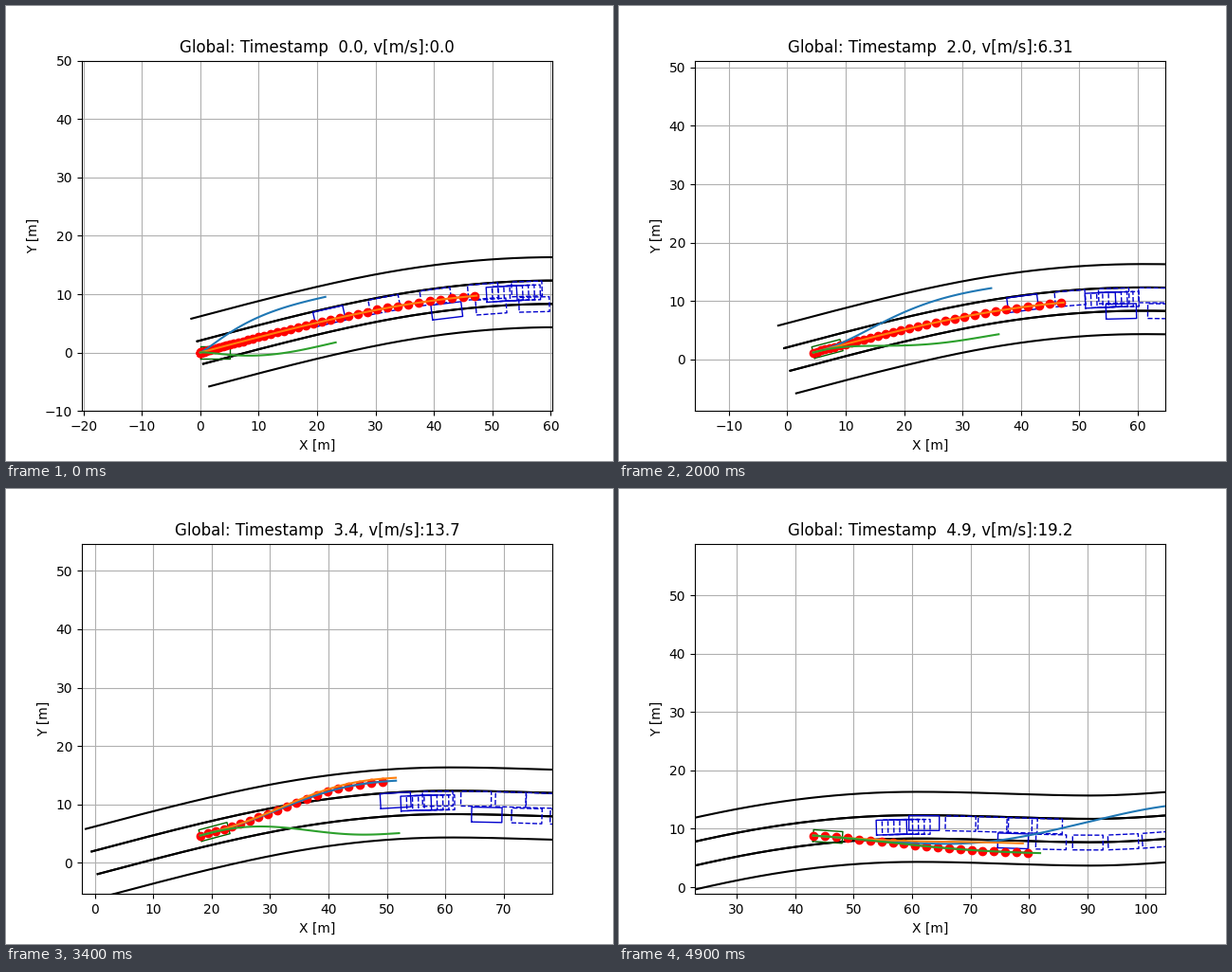
A matplotlib script that plays this animation: 640 px wide and 480 px high, repeating every 5 s.

```python
import numpy as np
import matplotlib.pyplot as plt
from matplotlib.animation import FuncAnimation

STEP = 0.1
FRAMES = 50
MERGE_LEFT, MERGE_RIGHT = 3.2, 3.9
LANE = 4

# Key points: position, value, slope
ROAD = np.array([(0, 0, 0.265), (30, 7.27, 0.195), (60, 10.33, 0.005),
                 (90, 9.7, -0.005), (110, 10.8, 0.08)])
DRIFT = np.array([(17, 0, 0), (27, 0.68, 0.075), (43, -0.45, -0.18)])

# Start, speed, acceleration, lateral offset
CARS = [(22.1, 9.75, -0.325, 0.65),
        (51.6, 1.0, 0, 0),
        (42.2, 7.7, -0.11, -2.05)]


def hermite(x, knots):
    p, y, m = knots.T
    i = np.clip(np.searchsorted(p, x, side="right") - 1, 0, len(p) - 2)
    h = p[i + 1] - p[i]
    u = (x - p[i]) / h
    return (y[i] * (1 - 3 * u**2 + 2 * u**3) + y[i + 1] * (3 * u**2 - 2 * u**3)
            + h * (m[i] * u * (1 - u)**2 + m[i + 1] * u**2 * (u - 1)))


def centre(x):
    return hermite(x, ROAD)


def drift(x):
    """Offset of the ego vehicle from the centre line."""
    return hermite(np.maximum(x, DRIFT[0, 0]), DRIFT)


def slope(curve, x):
    return (curve(x + 0.01) - curve(x - 0.01)) / 0.02


def road_point(x, offset):
    angle = np.arctan(slope(centre, x))
    return x - offset * np.sin(angle), centre(x) + offset * np.cos(angle)


def speed(t):
    t = np.minimum(t, 5.4)
    return t**2 * (2.17 - 0.296 * t + 0.0357 * np.maximum(t - 2.6, 0))


def drive(dt=0.01, end=8):
    """Position along X over time, from the speed and the road's heading."""
    times = np.arange(0, end, dt)
    xs = [0.0]
    for t in times[:-1]:
        heading = np.arctan(slope(centre, xs[-1]))
        xs.append(xs[-1] + speed(t + dt / 2) * np.cos(heading) * dt)
    return times, np.array(xs)


DRIVE = drive()


def progress(t):
    return np.interp(t, *DRIVE)


def ease(u):
    u = np.clip(u, 0, 1)
    return u**3 * (10 - 15 * u + 6 * u**2)


def lateral(x, t, reach, goal, hold=0):
    """Lane-change profile: a quintic in time, seen along the road."""
    start = progress(t)
    steady = min(0.28 * t, 1)
    grid = np.linspace(0, 1, 200)
    travelled = steady * grid + (1 - steady) * grid**2
    tau = np.interp((x - start) / reach, travelled, grid)
    swing = tau - 6 * tau**3 + 8 * tau**4 - 3 * tau**5
    return (drift(start) + reach * slope(drift, start) * swing
            + (goal - drift(start)) * ease((tau - hold) / (1 - hold)))


def plans(t):
    """Left, keep and right options as (reach, goal, hold), choice and pace."""
    reach = 22.3 + 4.4 * min(t, 2.6)
    if t < MERGE_LEFT:
        keep = (47.3 - progress(t), 0)
        return [(reach, LANE), keep, (reach, -LANE)], 1, 1
    if t < MERGE_RIGHT:
        return [(reach, LANE), (reach, 4.5), (reach, -5)], 0, 0.96
    late = max(t - 4, 0)
    return [(68, 2 * LANE - 4.7 * late, 0.31 * late),
            (36, -4.4 + 2.2 * late),
            (39, -4.9 + late)], 2, 0.96 + 0.04 * late


def draw_box(ax, x, y, angle, rear, front, half_width, **style):
    along = np.array([rear, front, front, rear, rear])
    side = half_width * np.array([-1, -1, 1, 1, -1])
    c, s = np.cos(angle), np.sin(angle)
    ax.plot(x + along * c - side * s, y + along * s + side * c, **style)


def draw_cars(ax, t):
    for start, v, a, offset in CARS:
        for ahead in range(5):
            when = t + ahead
            x = start + v * when + a * when**2
            draw_box(ax, x, centre(x) + offset, np.arctan(slope(centre, x)),
                     -2.6, 2.6, 1.27, color="mediumblue", lw=1,
                     ls="--" if ahead else "-")


def draw(i):
    t = round(i * STEP, 1)
    ax.cla()
    start = progress(t)
    ego_x, ego_y = road_point(start, drift(start))

    xs = np.linspace(0, 110, 300)
    for offset in (-6, -2, -2, 2, 2, 6):
        ax.plot(*road_point(xs, offset), "k", lw=1.5)

    draw_cars(ax, t)
    heading = np.arctan(slope(centre, start) + slope(drift, start)) if i else 0
    draw_box(ax, ego_x, ego_y, heading, 0, 5, 1, color="darkgreen", lw=1)

    options, choice, pace = plans(t)
    count = round(max(5.1 - t, 1.9) / STEP) + 1
    ahead = progress(t + STEP * np.arange(count)) - start
    dots = start + pace * ahead
    ax.plot(*road_point(dots, lateral(dots, t, *options[choice])), "-or")

    for option, color in zip(options, ("C0", "C1", "C2")):
        xs = start + option[0] * np.linspace(0, 1, 100)
        ax.plot(*road_point(xs, lateral(xs, t, *option)), color=color)

    half = 30 * 496 / 369.6
    ax.set_xlim(ego_x + 20 - half, ego_x + 20 + half)
    ax.set_ylim(ego_y - 10, ego_y + 50)
    ax.set_xlabel("X [m]")
    ax.set_ylabel("Y [m]")
    ax.set_title(f"Global: Timestamp  {t:.1f}, v[m/s]:{str(float(speed(t)))[:4]}")
    ax.grid(True)


fig, ax = plt.subplots(figsize=(6.4, 4.8), dpi=100)
anim = FuncAnimation(fig, draw, frames=FRAMES, init_func=lambda: None,
                     interval=100, repeat=True, repeat_delay=0)
plt.show()
```
